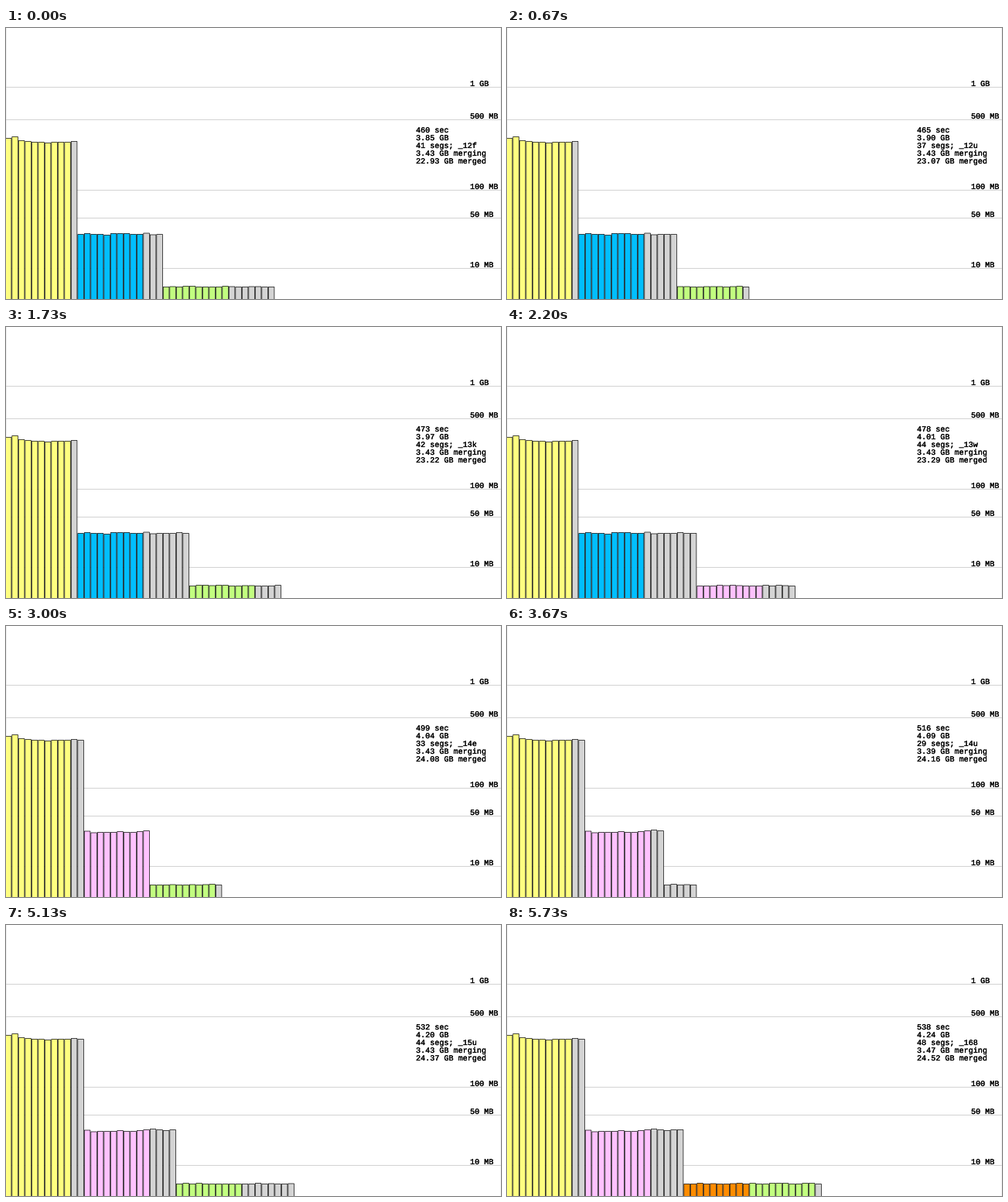
These frames come from a looping animation (640 px wide and 350 px high, 5800 ms). A matplotlib script:

```python
import random

import matplotlib.pyplot as plt
import numpy as np
from matplotlib.animation import FuncAnimation
from matplotlib.patches import Rectangle
from matplotlib.patheffects import withStroke

W, H, DPI = 640, 350, 100
PX = 72 / DPI
LOOP_MS, TICK_MS = 5800, 20
STEPS = 87                      # picture changes per loop
STEP_MS = LOOP_MS / STEPS
EVENTS_PER_STEP = 1.6
PITCH = 8.5

GRAY = "#d4d4d4"
YELLOW, BLUE = "#ffff80", "#00bfff"
GREEN, PINK, ORANGE = "#c2ff80", "#ffc2ff", "#ff8c00"
SMALL_COLORS = {"g": GREEN, "p": PINK, "o": ORANGE}
SMALL_ORDER = "gpgpgpggogogog"

GRID = {"1 GB": 76.5, "500 MB": 118.5, "100 MB": 209.5,
        "50 MB": 245.5, "10 MB": 310.5}
BIG_TOPS = [142, 140, 145, 146, 147, 147, 148, 147, 147, 147, 146]
MID_TOPS = [266, 265, 266, 266, 267, 265, 265, 265, 266, 266, 264.5, 266.5, 266]
MERGED_TOPS = [266, 266, 265, 266, 266, 265, 264, 263, 264, 265, 264, 264]

# Flush counts after which each small merge, and the first mid merge, finish.
SMALL_DONE = [2, 11, 21, 31, 41, 51, 59, 70, 77, 90, 101, 111]
MID_DONE = 56

# Wall clock over the event count.
CLOCK_EVENTS = [0, 30, 53, 72, 88, 107, 137]
CLOCK_SECS = [460, 470, 478, 499, 516, 526, 538]


def base36(n):
    digits = "0123456789abcdefghijklmnopqrstuvwxyz"
    out = ""
    while n:
        n, d = divmod(n, 36)
        out = digits[d] + out
    return out


class Index:
    """Segments on three size levels, merged ten at a time."""

    def __init__(self):
        self.rng = random.Random(4)
        self.flushes = 0
        self.next_id = 1384
        self.label = 1383
        self.size, self.merged = 3.852, 22.926
        self.started = 0
        self.small_done = 0
        self.running = {}
        self.segs = [self.seg(1, t) for t in BIG_TOPS]
        self.segs += [self.seg(2, t) for t in MID_TOPS]
        self.segs += [self.seg(3, self.small_top()) for _ in range(17)]
        self.mark(1, YELLOW, "big")
        self.mark(2, BLUE, "mid")
        self.start_small()

    @staticmethod
    def seg(level, top):
        return {"level": level, "top": top, "color": GRAY, "merge": None}

    def small_top(self):
        return self.rng.choice((334, 334, 333.5, 333))

    def idle(self, level):
        return [s for s in self.segs if s["level"] == level and s["merge"] is None]

    def mark(self, level, color, key):
        for s in self.idle(level)[:10]:
            s["color"], s["merge"] = color, key
        self.running[key] = level

    def start_small(self):
        self.mark(3, SMALL_COLORS[SMALL_ORDER[self.started]], self.started)
        self.started += 1

    def flush(self):
        self.flushes += 1
        self.label = self.next_id
        self.next_id += 1
        self.size += 0.0033
        self.segs.append(self.seg(3, self.small_top()))
        if len(self.idle(3)) > 10:
            self.start_small()
            self.next_id += 1
            self.merged += 0.0725

    def finish(self, key, top):
        level = self.running.pop(key) - 1
        self.segs = [s for s in self.segs if s["merge"] != key]
        at = sum(s["level"] <= level for s in self.segs)
        self.segs.insert(at, self.seg(level, top))
        if len(self.idle(2)) == 10:
            self.mark(2, PINK, "mid")
            self.next_id += 1
            self.merged += 0.65

    def step(self):
        k = self.small_done
        if k < len(SMALL_DONE) and self.flushes >= SMALL_DONE[k]:
            self.small_done += 1
            self.finish(k, MERGED_TOPS[k])
        elif self.flushes >= MID_DONE and any(s["color"] == BLUE for s in self.segs):
            self.size -= 0.022
            self.finish("mid", 147)
        else:
            self.flush()

    def snapshot(self, event):
        sec = int(np.interp(event, CLOCK_EVENTS, CLOCK_SECS) + 1e-6)
        cost = {1: 3.05, 2: 0.34, 3: 0.04}
        merging = sum(cost[level] for level in self.running.values())
        lines = [f"{sec} sec",
                 f"{self.size:.2f} GB",
                 f"{len(self.segs)} segs; _{base36(self.label)}",
                 f"{merging:.2f} GB merging",
                 f"{self.merged:.2f} GB merged"]
        return [(s["top"], s["color"]) for s in self.segs], lines


def event_at(step):
    return int(EVENTS_PER_STEP * step + 0.3)


def simulate():
    index, states = Index(), []
    for event in range(event_at(STEPS - 1) + 1):
        if event:
            index.step()
        states.append(index.snapshot(event))
    return states


states = simulate()

fig = plt.figure(figsize=(W / DPI, H / DPI), dpi=DPI, facecolor="white")
ax = fig.add_axes([0, 0, 1, 1])
ax.set_xlim(0, W)
ax.set_ylim(H, 0)
ax.axis("off")


def mono(x, y, s=""):
    return ax.text(x, y, s, family="Liberation Mono", size=10.1 * PX,
                   color="black", va="baseline", ha="left", zorder=4,
                   path_effects=[withStroke(linewidth=0.25 * PX, foreground="black")])


def rule(xs, ys, color):
    ax.plot(xs, ys, color=color, lw=PX, snap=False, zorder=1)


for x in (0.5, W - 0.5):
    rule([x, x], [0, H], "#f0f0f0")
for name, y in GRID.items():
    rule([0, W], [y, y], "#d3d3d3")
    mono(600, y - 1.5, name)

info = [mono(530, 135 + 10 * i) for i in range(5)]
bars = []
for i in range(max(len(segs) for segs, _ in states)):
    bar = Rectangle((PITCH * i - 0.7, 0), 7.6, 0, ec="black", lw=0.7 * PX,
                    snap=False, zorder=2)
    bars.append(ax.add_patch(bar))


def draw(tick):
    # Round the clock up within the tick so that no change comes late.
    step = int((tick * TICK_MS + 14) / STEP_MS)
    segs, lines = states[event_at(step)]
    for i, bar in enumerate(bars):
        bar.set_visible(i < len(segs))
        if i < len(segs):
            top, color = segs[i]
            bar.set_y(top + 0.5)
            bar.set_height(H + 5 - top)
            bar.set_facecolor(color)
    for text, line in zip(info, lines):
        text.set_text(line)
    return bars + info


anim = FuncAnimation(fig, draw, frames=LOOP_MS // TICK_MS, interval=TICK_MS,
                     repeat=True, repeat_delay=0, blit=False)
plt.show()
```
